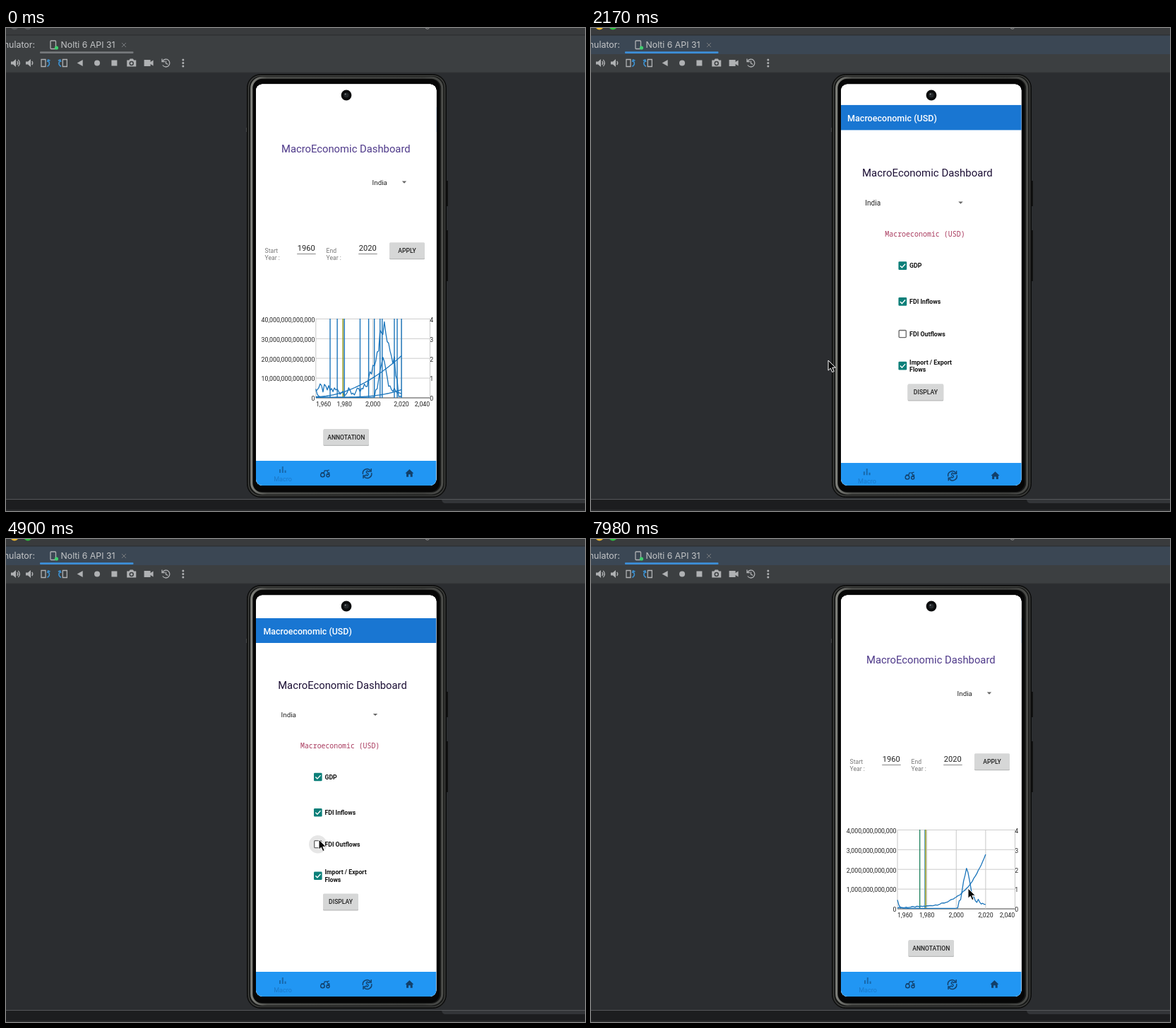
Recreate the animation shown at these times as an HTML page. Size 820x683 px, loop 8000 ms.

```html
<!DOCTYPE html>
<html lang="en">
<head>
<meta charset="utf-8">
<title>Macro dashboard demo</title>
<style>
  html, body { margin: 0; width: 100%; height: 100%; overflow: hidden; background: #2b2d30; }
  svg { display: block; width: 820px; height: 683px; }
  text { font-family: Roboto, sans-serif; fill: #222; white-space: pre; }
  .ide text { font-family: Inter, sans-serif; fill: #c3c5c7; }
  .mono { font-family: "Noto Sans Mono", monospace; fill: #a93a5e; }
  .mid { text-anchor: middle; }
  .end { text-anchor: end; }
  .med { font-weight: 500; }
  .bold { font-weight: 700; fill: #111; }
  .line { fill: none; stroke: #1b75bb; stroke-width: 1.3; stroke-linejoin: round; }
  .ico { fill: #afb1b3; }
  .arc { fill: none; stroke: #afb1b3; stroke-width: 1.3; }
  .blue { fill: none; stroke: #3d94d6; stroke-width: 1.5; }
</style>
</head>
<body>
<svg viewBox="0 0 820 683" xmlns="http://www.w3.org/2000/svg">
  <defs>
    <linearGradient id="rim">
      <stop offset="0" stop-color="#80817c"/><stop offset=".08" stop-color="#4a4b48"/>
      <stop offset=".9" stop-color="#3a3b39"/><stop offset="1" stop-color="#4c4d4a"/>
    </linearGradient>
    <clipPath id="glass"><rect x="354" y="79.5" width="255.5" height="567.5" rx="9"/></clipPath>
  </defs>

  <g class="ide">
    <rect width="820" height="683" fill="#2b2d30"/>
    <rect width="820" height="10" fill="#393b3d"/>
    <path d="M594 0q4 3 6-1" fill="none" stroke="#999"/>
    <circle class="lamp" cx="12" cy="-3.5" r="6"/>
    <circle class="lamp" cx="31" cy="-3.5" r="6"/>
    <rect id="bar" y="10" width="820" height="27"/>
    <rect y="9.5" width="820" height="1" fill="#2b2c2e"/>
    <rect id="tab" x="48" y="11" width="133" height="25" fill="#4b4e50"/>
    <rect id="under" x="48" y="33.3" width="132.5" height="2.8" rx="1"/>
    <text class="end" x="41" y="28" font-size="12.4">Emulator:</text>
    <rect x="63" y="18" width="7.5" height="11.5" rx="1" fill="none" stroke="#afb1b3" stroke-width="1.3"/>
    <circle cx="71.5" cy="28" r="2.6" fill="#3ecf6e"/>
    <text x="77.5" y="28" font-size="12.3">Nolti 6 API 31</text>
    <path d="M164 21l6 6m0-6l-6 6" stroke="#777a7d"/>
    <rect y="37" width="820" height="26" fill="#3c3f41"/>
    <rect y="62.5" width="820" height="1" fill="#323437"/>
    <rect id="hover" x="96" y="41" width="18" height="18" rx="2" fill="#4c5052"/>
    <g id="tools"></g>
    <rect y="666" width="820" height="1" fill="#55575a"/>
    <rect y="667" width="820" height="16" fill="#1c1d1f"/>
    <path d="M617 667h203v5H622q-4 0-5-5z" fill="#333538"/>
    <rect y="681" width="820" height="2" fill="#2a2b2d"/>
  </g>

  <g fill="none">
    <path d="M624.5 216v36M624.5 286v72" stroke="#101111" stroke-width="3"/>
    <path d="M341 141v6" stroke="#555" stroke-width="1.5"/>
    <rect x="341.5" y="65.5" width="282" height="598" rx="19" fill="#171817" stroke="#0b0b0b"/>
    <rect x="343.5" y="67.5" width="278" height="594" rx="17" stroke="#434442" stroke-width="1.2"/>
    <rect x="347.7" y="70.2" width="270" height="588" rx="15" stroke="url(#rim)" stroke-width="3"/>
    <rect x="350" y="72" width="264" height="584" rx="13" fill="#060606"/>
  </g>
  <g clip-path="url(#glass)">
    <rect x="354" y="79" width="256" height="569" fill="#fff"/>
    <g id="menu"></g>
    <g id="graph"></g>
  </g>
  <circle cx="482" cy="95" r="7.4" fill="#0b0c0d"/>
  <circle cx="482" cy="95" r="3.6" fill="#23272a"/>
  <circle cx="480.6" cy="93.5" r="1" fill="#8b9094"/>

  <circle id="ring" r="20" fill="none" stroke="#111" stroke-width="1.5"/>
  <path id="mouse" d="M0 0V14.2L3.3 11.2L5.7 16.6L8.2 15.5L5.8 10.2H10.4Z" fill="#060606" stroke="#fff" stroke-linejoin="round"/>
</svg>
<script>
const $ = id => document.getElementById(id);
const text = (x, y, size, str, cls = '', fill = '') =>
  `<text x="${x}" y="${y}" font-size="${size}" class="${cls}"${fill && ` style="fill:${fill}"`}>${str}</text>`;
const rect = (x, y, w, h, fill, more = '') =>
  `<rect x="${x}" y="${y}" width="${w}" height="${h}" fill="${fill}" ${more}/>`;
const path = (d, more = '') => `<path d="${d}" ${more}/>`;
const at = (x, y, body) => `<g transform="translate(${x} ${y})">${body}</g>`;
const page = rect(330, 60, 300, 600, '#fff');

const button = (x, y, w, label) =>
  rect(x, y + 1, w, 23, '#b9baba', 'rx="1.5"') + rect(x, y, w, 22.7, '#d6d7d7', 'rx="1.5"') +
  text(x + w / 2, y + 14.5, 8.6, label, 'mid med');
const caret = (x, y) => path(`M${x - 3.2} ${y - 1.4}h6.4l-3.2 3.2z`, 'fill="#666"');

// Emulator toolbar
const speaker = path('M-6-2h3l4-3.5v11l-4-3.5h-3z', 'class="ico"') + path('M2.7-2.6q2.2 2.6 0 5.2', 'class="arc"');
const turn = path('M-6-5h6v10h-6z', 'class="arc"') + path('M2.5 5Q7.5 2 4-3M2.5-1.5L3.5-4.5L6.5-3.5', 'class="blue"');
$('tools').innerHTML = [
  speaker + path('M4.3-4.6q4 4.6 0 9.2', 'class="arc"'),
  speaker,
  turn,
  `<g transform="scale(-1 1)">${turn}</g>`,
  path('M4-4.5v9l-8-4.5z', 'class="ico"'),
  '<circle r="4" class="ico"/>',
  path('M-4-4h8v8h-8z', 'class="ico"'),
  path('M-6.5-4h3l1.5-2h4l1.5 2h3v9h-13z', 'class="ico"') + '<circle cy=".5" r="2.5" fill="none" stroke="#3c3f41" stroke-width="1.5"/>',
  path('M-6.5-4.5h9v3l4-2.5v8l-4-2.5v3h-9z', 'class="ico"'),
  path('M-4.6-2.8A5.4 5.4 0 1 1-4.6 3M-5.5-6v4h4M0-3v3.3l2.8 1.7', 'class="arc"'),
  [-1, 0, 1].map(i => `<circle cy="${i * 4.5}" r="1.5" class="ico"/>`).join(''),
].map((body, i) => at(i < 2 ? 13 + 21 * i : 7.3 + 24.35 * i, 49.5, body)).join('');

// Bottom navigation shared by both pages
const ink = '#123f69';
const nav = rect(354, 612, 255.5, 45, '#2196f3') + [
  path('M-4-1v-5M-.2-1v-9M3.6-1v-3.5', 'stroke="#1769ac" stroke-width="2"') + text(0, 10.5, 9, 'Macro', 'mid', '#1a7acb'),
  path('M-5.5-1.2h4l1-3h3.5l1 3h2v2h-4M3-4.2l3-.8', `fill="none" stroke="${ink}" stroke-width="1.2"`) +
    `<g fill="none" stroke="${ink}" stroke-width="1.4"><circle cx="-3.4" cy="2" r="2.8"/><circle cx="4.2" cy="2.8" r="2"/></g>`,
  path('M-6 1A6 6 0 0 1 4.5-4.2M6-1A6 6 0 0 1-4.5 4.2M5.6-7v4h-4M-5.6 7v-4h4', `fill="none" stroke="${ink}" stroke-width="1.4"`) +
    text(0, 3.2, 9, '$', 'mid bold', ink),
  path('M0-6l-6 5.7h1.7v5h3v-3.4h2.6v3.4h3v-5h1.7z', `fill="${ink}"`),
].map((body, i) => at(392 + 59.8 * i, 630, body)).join('');

// Checkbox page
const box = (y, on) => on
  ? rect(436, y - 5.8, 11.6, 11.6, '#0b7f79', 'rx="1.3"') + path(`M438.4 ${y}l2.5 2.6l4.6-5`, 'fill="none" stroke="#fff" stroke-width="1.4"')
  : rect(436.7, y - 5, 10, 10, '#fff', 'rx="1" stroke="#666" stroke-width="1.3"');
const label = (y, str) => text(451.5, y, 8.7, str, 'bold');
$('menu').innerHTML = page +
  rect(354, 112, 255.5, 35, '#1976d2') + text(364.5, 134.5, 12.4, 'Macroeconomic (USD)', 'med', '#fff') +
  text(476.5, 211.5, 14.8, 'MacroEconomic Dashboard', 'mid', '#1d1036') +
  text(389.5, 252, 9.9, 'India') + caret(523, 248.3) +
  text(417, 296, 9.85, 'Macroeconomic (USD)', 'mono') +
  '<circle id="ripple" cx="441.7" cy="431.7" r="12.7" fill="#e6e6e6"/>' +
  box(336.5, 1) + box(386.7, 1) + box(431.7, 0) + `<g id="tick">${box(431.7, 1)}</g>` + box(476.2, 1) +
  label(339.7, 'GDP') + label(390, 'FDI Inflows') + label(435.2, 'FDI Outflows') +
  label(474.3, 'Import / Export') + label(484.5, 'Flows') +
  button(449, 501.5, 50, 'DISPLAY') + nav;

// Charts: every series gives a height above the axis, in pixels, for a year since 1960
const BASE = 523, TOP = 411, SPAN = 60;
const clamp = (v, max = 1) => Math.max(0, Math.min(max, v));
const noise = n => { const s = Math.sin(n * 12.9898) * 43758.5453; return (s - Math.floor(s)) * 2 - 1; };
const inflow = n => .7 + 12 * Math.exp(-n) + 48 * Math.exp(-(((n - 47.3) / 3) ** 2)) +
  (n > 41 ? 9 + 5 * noise(n) : 0);
const trade = n => {
  const h = 14 - .25 * n + 92 * Math.exp(-(((n - 48) / 9) ** 2));
  return n > 57 ? 2 : h + (5 + .14 * h) * noise(n + 7);
};
const total = n => 1.5 + 58 * (n / SPAN) ** 1.9;
const outflow = n => .7 + 11 * (n / SPAN) ** 4;
const growth = n => 1.5 + 70 * (n / SPAN) ** 4.6 + 6 * n / SPAN + .8 * noise(n);

function chart(id, left, unit, series, bars) {
  const x = n => left + (600.5 - left) * n / 80;
  const vline = ([n, color]) => path(`M${x(n)} ${TOP}V${BASE}`, `stroke="${color}" stroke-width="1.4"`);
  let out = '';
  for (let i = 0; i < 5; i++) {
    const y = BASE - 27.9 * i, gx = x(20 * i);
    out += path(`M${left} ${y}H601`, `stroke="${i ? '#ccc' : '#444'}"`) +
      path(`M${gx} ${TOP}V${BASE}`, 'stroke="#c8c8c8"') +
      text(left - 1.5, y + 4.3, 8.75, i ? i + unit : 0, 'end') + text(600.3, y + 4.3, 8.75, i) +
      text(clamp(Math.max(gx, left + 10.8), 589.5), 535, 8.75, (1960 + 20 * i).toLocaleString('en-US'), 'mid');
  }
  const curve = f => {
    const pts = Array.from({ length: SPAN + 1 }, (_, n) => `${x(n)},${BASE - clamp(f(n), BASE - TOP)}`);
    return `<polyline class="line" points="${pts.join(' ')}"/>`;
  };
  return `<g id="${id}">${out}${bars.map(vline).join('')}${series.map(curve).join('')}</g>`;
}
const blue = '#1b75bb', olive = '#96960f';
const spikes = [10, 15, 20, 31, 37, 41, 45, 46.5, 55, 57, 60].map(n => [n, blue]);
$('graph').innerHTML = page +
  text(481.3, 176.3, 14.8, 'MacroEconomic Dashboard', 'mid', '#4f3a8a') +
  text(518.5, 221.8, 9.9, 'India') + caret(564, 218) +
  [['Start', 1960], ['End', 2020]].map(([s, year], i) => at(87 * i, 0,
    text(366.6, 318, 8.6, s, '', '#777') + text(366.6, 328, 8.6, 'Year :', '', '#777') +
    text(425.2, 315, 11.1, year, 'mid') + rect(412.2, 319, 26.5, 1, '#888'))).join('') +
  button(543, 303.3, 50, 'APPLY') + button(449.5, 567, 64.5, 'ANNOTATION') +
  chart('before', 438.8, '0,000,000,000,000', [trade, total, inflow, outflow], [...spikes, [19, olive]]) +
  chart('after', 434, ',000,000,000,000', [growth, inflow], [[15.2, '#278764'], [18.6, '#64a6cc'], [19.2, olive]]) + nav;

// Pointer moves: start, end, x, y
const moves = [
  [70, 980, 99, 46], [1960, 2170, 336, 470], [2170, 2450, 412, 662], [2450, 3080, 465, 627],
  [3150, 4130, 444, 411], [4340, 4550, 443, 425], [5180, 6020, 459, 512], [7700, 7980, 534, 494],
];
const clicks = [[4200, 4340], [4970, 5040], [6300, 6440]];
const STEP = 70, LOOP = 8000;
const easeOut = k => 1 - (1 - k) ** 2;
const within = (t, a, b) => t >= a && t < b;
const show = (id, on) => $(id).style.opacity = +on;
const fill = (id, color) => $(id).setAttribute('fill', color);
const move = (id, x, y) => $(id).setAttribute('transform', `translate(${x} ${y})`);
const zoom = (id, s) => $(id).setAttribute('transform', `translate(481.75 363.5) scale(${s}) translate(-481.75 -363.5)`);

const pointer = t => moves.reduce(([px, py], [a, b, x, y]) => {
  const k = easeOut(clamp((t - a) / (b - a)));
  return [px + (x - px) * k, py + (y - py) * k];
}, [555, 664]);

function draw(now) {
  const t = Math.floor(now % LOOP / STEP) * STEP;
  const focus = t >= 1610, back = t >= 2030, open = t >= 6510;
  document.querySelectorAll('.lamp').forEach((el, i) => el.setAttribute('fill', focus ? ['#f5bd2f', '#2bc840'][i] : '#55575a'));
  fill('bar', focus ? '#3b4754' : '#3c3f41');
  fill('under', focus ? '#3d8fd8' : '#75787b');
  show('tab', within(t, 770, 980));
  show('hover', within(t, 1050, 2030));

  const [x, y] = pointer(t);
  move('mouse', x, y);
  move('ring', x - .3, y - .8);
  show('mouse', t >= 70);
  show('ring', clicks.some(([a, b]) => within(t, a, b)));

  show('ripple', within(t, 4900, 5250) ? 1 : within(t, 5250, 5390) ? .5 : 0);
  show('tick', t >= 5040);

  zoom('menu', back && t < 2800 ? 1 + .1 * Math.exp((1970 - t) / 95) : 1);
  zoom('graph', open && t < 6930 ? 1 - .15 * Math.exp((6470 - t) / 100) : 1);
  show('graph', open ? clamp((t - 6440) / 140) : clamp((2100 - t) / 140));
  show('before', !open);
  show('after', open);
}

function tick() {
  draw(performance.now());
  requestAnimationFrame(tick);
}
tick();
</script>
</body>
</html>
```
